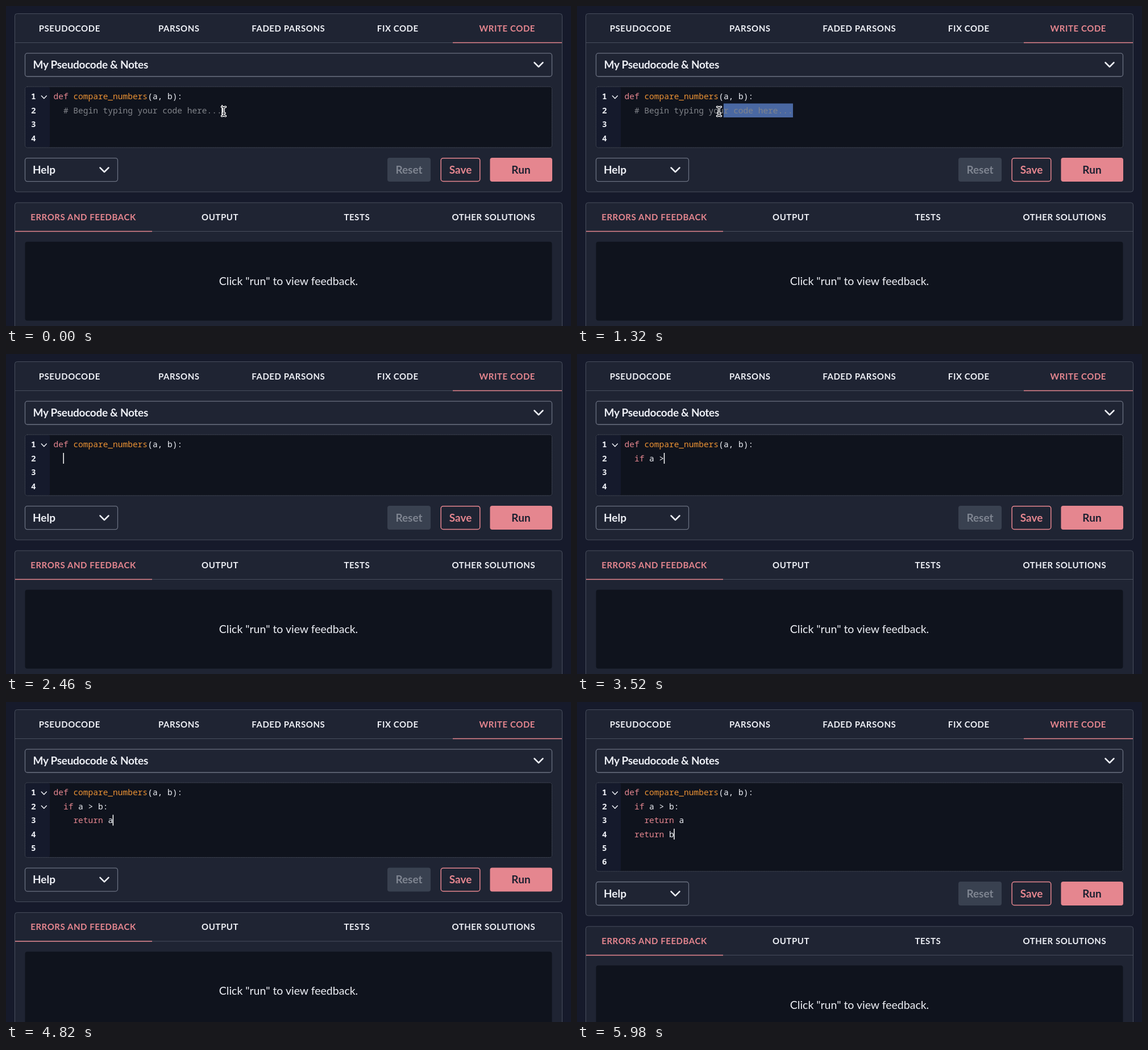
An HTML page for the animation above (6000 ms loop, 994 by 563 pixels).

```html
<!DOCTYPE html>
<html lang="en">
<head>
<meta charset="utf-8">
<title>Code editor</title>
<style>
  html, body { margin: 0; width: 100%; height: 100%; overflow: hidden; background: #161a2b; }
  svg { display: block; width: 100%; height: 100%; }
  text { font-family: Lato, "Open Sans", sans-serif; fill: #eef0f6; white-space: pre; }
  .tab { font-size: 15px; font-weight: 700; letter-spacing: .55px; text-anchor: middle; }
  .label { font-size: 19px; font-weight: 700; }
  .mid { text-anchor: middle; }
  .title { letter-spacing: -.3px; }
  .message { font-size: 19.5px; text-anchor: middle; }
  .code text { font: 14.533px "Noto Sans Mono", "DejaVu Sans Mono", monospace; }
  .code .num { font-weight: 600; }
  .code .word, text.pink { fill: #e5868f; }
  .code .name { fill: #ec9334; }
  .code .note { fill: #82858b; }
  .panel { fill: #1f2433; stroke: #484e5d; }
  .box { fill: none; stroke: #6a7080; stroke-width: 1.3; }
  .line { stroke: #484e5d; }
  .mark { stroke: #e5868f; stroke-width: 1.5; }
  .dark { fill: #0f131d; }
  .arrow { fill: none; stroke: #eef0f6; stroke-width: 2.5; stroke-linecap: round; stroke-linejoin: round; }
  .fold { stroke-width: 1.5; }
</style>
</head>
<body>
<svg viewBox="0 0 994 563" preserveAspectRatio="none">
  <rect width="994" height="563" fill="#161a2b"/>
  <rect id="top" class="panel" x="15.5" y="13.5" width="963" height="313.5" rx="4"/>
  <path class="line" d="M16 64.5H978"/>
  <path class="mark" d="M786 64.5H978"/>
  <g id="modes"></g>
  <rect class="box" x="33.5" y="83.2" width="927" height="40.8" rx="4"/>
  <text class="label title" x="47.5" y="110.3">My Pseudocode &amp; Notes</text>
  <path class="arrow" d="M929.5 99.5l7.5 7.5 7.5-7.5"/>

  <rect id="editor" class="dark" x="33.5" y="142" width="927" height="107" rx="4"/>
  <rect id="gutter" x="34" y="142.5" width="43" height="106" rx="3" fill="#151a2c"/>
  <rect id="frame" x="33.5" y="142" width="927" height="107" rx="4" fill="none" stroke="#5c6270" stroke-dasharray="1.2 1.2"/>
  <rect id="select" y="171.5" height="24.5" fill="#4a68a2"/>
  <g id="code" class="code"></g>
  <rect id="caret" width="1.5" height="19" fill="#fff"/>

  <g id="low">
    <rect class="box" x="33.5" y="267.6" width="163" height="41" rx="4"/>
    <text class="label" x="47" y="295">Help</text>
    <path class="arrow" d="M165.5 284.5l7.5 7.5 7.5-7.5"/>
    <rect x="671" y="267" width="76" height="42" rx="4" fill="#394150"/>
    <text class="label mid" x="709" y="295" style="fill:#7f8591">Reset</text>
    <rect x="765.2" y="267.7" width="68.6" height="40.8" rx="4" fill="none" stroke="#e5868f" stroke-width="1.5"/>
    <text class="label mid pink" x="799.5" y="295">Save</text>
    <rect x="851.5" y="267" width="109.5" height="42" rx="4" fill="#e5868f"/>
    <text class="label mid" x="906" y="295" style="fill:#1b2030">Run</text>

    <rect class="panel" x="15.5" y="346" width="963" height="260" rx="4"/>
    <path class="line" d="M16 396.5H978"/>
    <path class="mark" d="M16 396.5H257"/>
    <g id="results"></g>
    <rect class="dark" x="33.5" y="414.7" width="927" height="138.8" rx="4"/>
    <text class="message" x="497" y="491">Click "run" to view feedback.</text>
  </g>

  <g id="mouse" fill="none" stroke-linecap="round">
    <path id="beam" d="M-3.5-8Q-.5-8 0-6Q.5-8 3.5-8M0-6V6M-3.5 8Q-.5 8 0 6Q.5 8 3.5 8M-2 3H2" stroke="#fff" stroke-width="3.4"/>
    <use href="#beam" style="stroke:#111"/>
    <path d="M-3.5-8Q-.5-8 0-6Q.5-8 3.5-8M0-6V6M-3.5 8Q-.5 8 0 6Q.5 8 3.5 8M-2 3H2" stroke="#14171f" stroke-width="1.2"/>
  </g>
</svg>
<script>
const LOOP = 6000, LEFT = 83.5, CHAR = 8.72, ROW = 24.45, BLINK = 600;
const DRAG = 1160, DROP = 1500, CLEAR = 2260;
const HINT = '  # Begin typing your code here...';
const $ = id => document.getElementById(id);
const set = (id, attrs) => { for (const k in attrs) $(id).setAttribute(k, attrs[k]); };
const colX = col => LEFT + col * CHAR;

// Keystrokes: times and keys; "<" removes one indent.
const typing = [
  ['if a ', 2540, 2580, 2620, 2660, 2680],
  ['> b:\n', 3520, 3680, 3820, 4060, 4180],
  ['return a\n', 4280, 4340, 4420, 4480, 4540, 4620, 4760, 4820, 5000],
  ['<return b', 5180, 5260, 5320, 5400, 5460, 5520, 5580, 5680, 5860]
];
const keys = typing.flatMap(([text, ...times]) => times.map((time, i) => ({ time, key: text[i] })));

function bodyAt(t) {
  if (t < CLEAR) return { body: HINT, last: 280 - BLINK };
  let body = '  ', last = CLEAR;
  for (const { time, key } of keys) {
    if (time > t) break;
    last = time;
    if (key === '<') body = body.slice(0, -2);
    else body += key === '\n' ? '\n    ' : key;
  }
  return { body, last };
}

function tabs(id, y, names, active) {
  $(id).innerHTML = names.map(([name, x], i) =>
    `<text class="tab ${i === active ? 'pink' : ''}" x="${x}" y="${y}">${name}</text>`).join('');
}

const put = (cls, x, y, s) => `<text class="${cls}" x="${x}" y="${y}">${s.replace('>', '&gt;')}</text>`;
const rowY = i => 164.2 + i * ROW;

function codeLine(line, i) {
  const tokens = line.matchAll(/#.*|[\w]+|[^\s\w]+/g);
  return [...tokens].map(({ 0: s, index }) => {
    const cls = s[0] === '#' ? 'note' : /^(def|if|return)$/.test(s) ? 'word' : s === 'compare_numbers' ? 'name' : '';
    return put(cls, colX(index), rowY(i), s);
  }).join('');
}

const fold = i => `<path class="arrow fold" d="M62.3 ${158 + i * ROW}l4.5 4.7 4.5-4.7"/>`;

let shown;
function drawCode(body) {
  if (body === shown) return;
  shown = body;
  const lines = ['def compare_numbers(a, b):', ...body.split('\n')];
  const added = lines.length - 2, count = added + 4, shift = added * ROW;
  let html = lines.map(codeLine).join('') + fold(0) + (added ? fold(1) : '');
  for (let i = 0; i < count; i++) html += put('num', 44, rowY(i), String(i + 1));
  $('code').innerHTML = html;
  set('editor', { height: 107 + shift });
  set('frame', { height: 107 + shift });
  set('gutter', { height: 106 + shift });
  set('top', { height: 313.5 + shift });
  set('low', { transform: `translate(0 ${shift})` });
}

function draw(t) {
  const { body, last } = bodyAt(t);
  drawCode(body);

  const u = Math.min(1, Math.max(0, (t - DRAG) / (DROP - DRAG)));
  const x = 383 - 289 * u * u * (3 - 2 * u);
  set('mouse', { transform: `translate(${x} 185.5)`, visibility: t < CLEAR ? 'visible' : 'hidden' });

  const selecting = t >= DRAG && t < CLEAR;
  const head = Math.min(HINT.length, Math.ceil((x - LEFT) / CHAR));
  set('select', { x: colX(head), width: selecting ? (HINT.length - head) * CHAR : 0 });

  const rows = body.split('\n');
  const on = !selecting && Math.floor((t - last) / BLINK) % 2 === 0;
  set('caret', {
    x: colX(rows.at(-1).length) - .5,
    y: 174 + (rows.length - 1) * ROW,
    visibility: on ? 'visible' : 'hidden'
  });
}

tabs('modes', 45, [['PSEUDOCODE', 111.8], ['PARSONS', 304.3], ['FADED PARSONS', 496.8], ['FIX CODE', 689.3], ['WRITE CODE', 881.8]], 4);
tabs('results', 377, [['ERRORS AND FEEDBACK', 136], ['OUTPUT', 376.5], ['TESTS', 617.3], ['OTHER SOLUTIONS', 857.8]], 0);

const start = performance.now();
function tick() {
  draw((performance.now() - start) % LOOP);
  requestAnimationFrame(tick);
}
tick();
</script>
</body>
</html>
```
